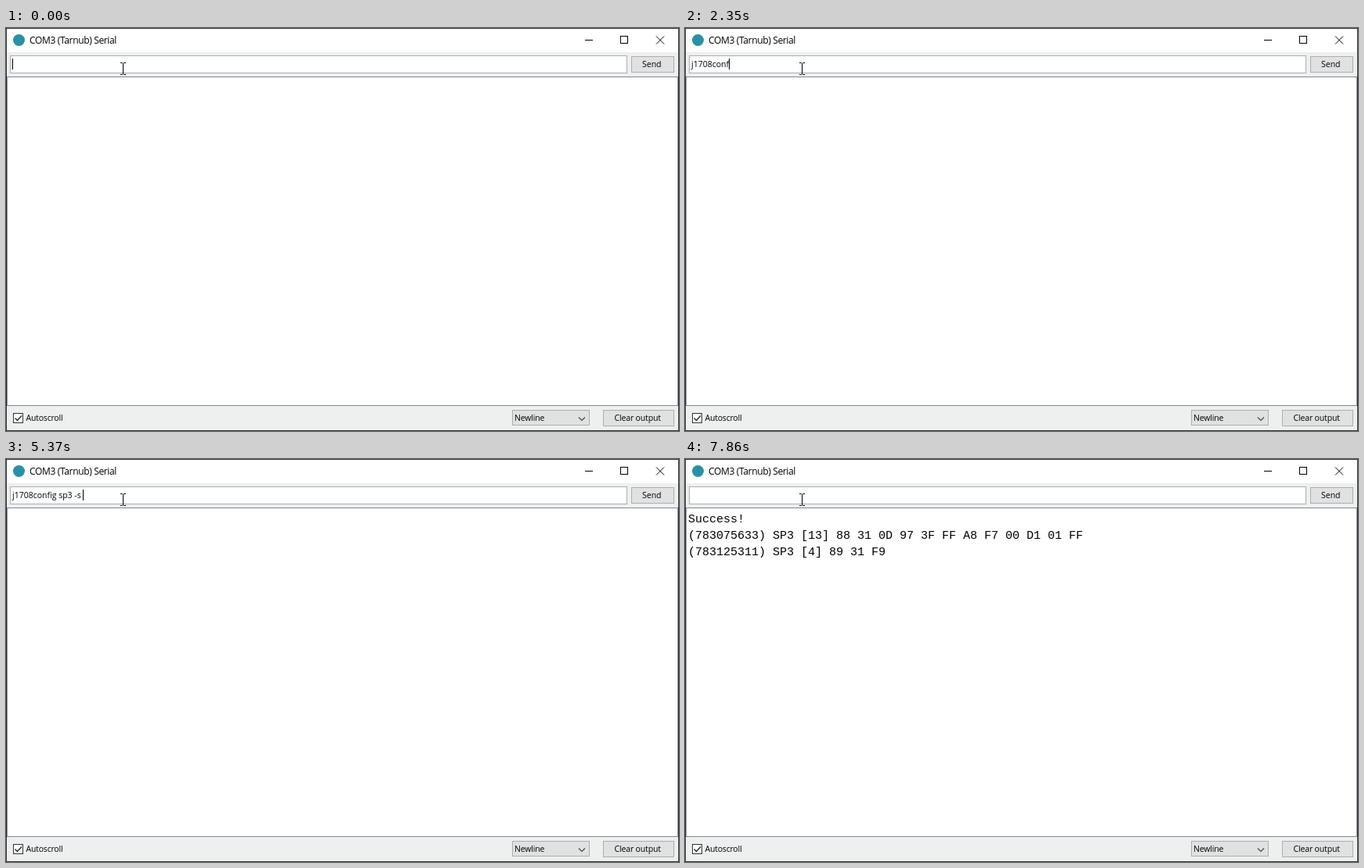
Animation, 859 px wide and 515 px high, one loop 8 s. Source, as an HTML page:

```html
<!DOCTYPE html>
<html lang="en">
<head>
<meta charset="utf-8">
<title>Serial monitor</title>
<style>
  html, body { margin: 0; width: 100%; height: 100%; overflow: hidden; }
  svg { display: block; }
  text { font: 10.5px "Open Sans", sans-serif; fill: #000; white-space: pre; }
  .title { font-size: 12px; letter-spacing: -.35px; }
  .label { letter-spacing: -.15px; }
  .output { font: 15px "Liberation Mono", monospace; }
  .button { fill: #e1e1e1; stroke: #adadad; }
  .line { fill: none; stroke: #000; }
  rect { shape-rendering: crispEdges; }
</style>
</head>
<body>
<svg width="859" height="515" viewBox="0 0 859 515">
  <rect x=".5" y=".5" width="858" height="514" fill="#eef0f0" stroke="#2d3036"/>
  <rect x="1" y="1" width="857" height="30" fill="#fff"/>
  <circle cx="16.5" cy="15.5" r="7.5" fill="#2a91a4"/>
  <text class="title" x="30" y="20">COM3 (Tarnub) Serial</text>
  <path class="line" d="M739 15.5h10M784.5 10.5h9v9h-9z" shape-rendering="crispEdges"/>
  <path class="line" d="M830 10.5l10 10m0-10l-10 10"/>

  <rect x="5.5" y="35.5" width="787" height="22" fill="#fff" stroke="#abadb3"/>
  <text id="input" x="8" y="50"></text>
  <rect id="caret" y="39" width="1" height="14"/>
  <rect class="button" x="798.5" y="36.5" width="54" height="20"/>
  <text x="812" y="50">Send</text>
  <path class="line" d="M146 44.5h2.5l1 1l1-1h2.5M149.5 45v14M146 59.5h2.5l1-1l1 1h2.5"/>

  <rect x="1.5" y="62.5" width="856" height="420" fill="#fff" stroke="#828790"/>
  <g id="lines">
    <text class="output" x="4" y="81">Success!</text>
    <text class="output" x="4" y="102">(783075633) SP3 [13] 88 31 0D 97 3F FF A8 F7 00 D1 01 FF</text>
    <text class="output" x="4" y="123">(783125311) SP3 [4] 89 31 F9</text>
  </g>

  <rect x="9.5" y="492.5" width="12" height="12" fill="#fff" stroke="#333"/>
  <path d="M11.5 498.5l3 3l5.5-6" fill="none" stroke="#222" stroke-width="1.3"/>
  <text class="label" x="25.5" y="502" style="letter-spacing:-.2px">Autoscroll</text>
  <rect class="button" x="646.5" y="488.5" width="98" height="19"/>
  <text class="label" x="649" y="502">Newline</text>
  <path d="M731 497.5l4 4l4-4" fill="none" stroke="#444" stroke-width="1.1"/>
  <rect class="button" x="762.5" y="488.5" width="90" height="20"/>
  <text class="label" x="776.5" y="502">Clear output</text>
</svg>
<script>
const LOOP = 8000, BLINK = 490, SENT = 7370;
const command = "j1708config sp3 -s -d";
const keyTimes = [800, 1130, 1230, 1320, 1550, 2010, 2120, 2240, 2350, 2470, 2580,
  2740, 3930, 4100, 4420, 4550, 4730, 4930, 5370, 6430, 6790];
const lineTimes = [7450, 7520, 7600];
const input = document.getElementById("input");
const caret = document.getElementById("caret");
const lines = [...document.getElementById("lines").children];

const show = (el, on) => el.setAttribute("visibility", on ? "visible" : "hidden");

function draw(t) {
  const sent = t >= SENT;
  const typed = keyTimes.filter(k => k <= t).length;
  const lastKey = sent ? SENT : typed ? keyTimes[typed - 1] : -60;
  const text = sent ? "" : command.slice(0, typed);
  if (input.textContent !== text) input.textContent = text;
  const width = text ? input.getComputedTextLength() : 0;
  caret.setAttribute("x", Math.round(8 + width));
  // Every key press restarts the blink
  show(caret, (t - lastKey) % (2 * BLINK) < BLINK);
  lines.forEach((line, i) => show(line, t >= lineTimes[i]));
}

let start;
function tick(now) {
  start ??= now;
  draw((now - start) % LOOP);
  requestAnimationFrame(tick);
}
draw(0);
requestAnimationFrame(tick);
</script>
</body>
</html>
```
